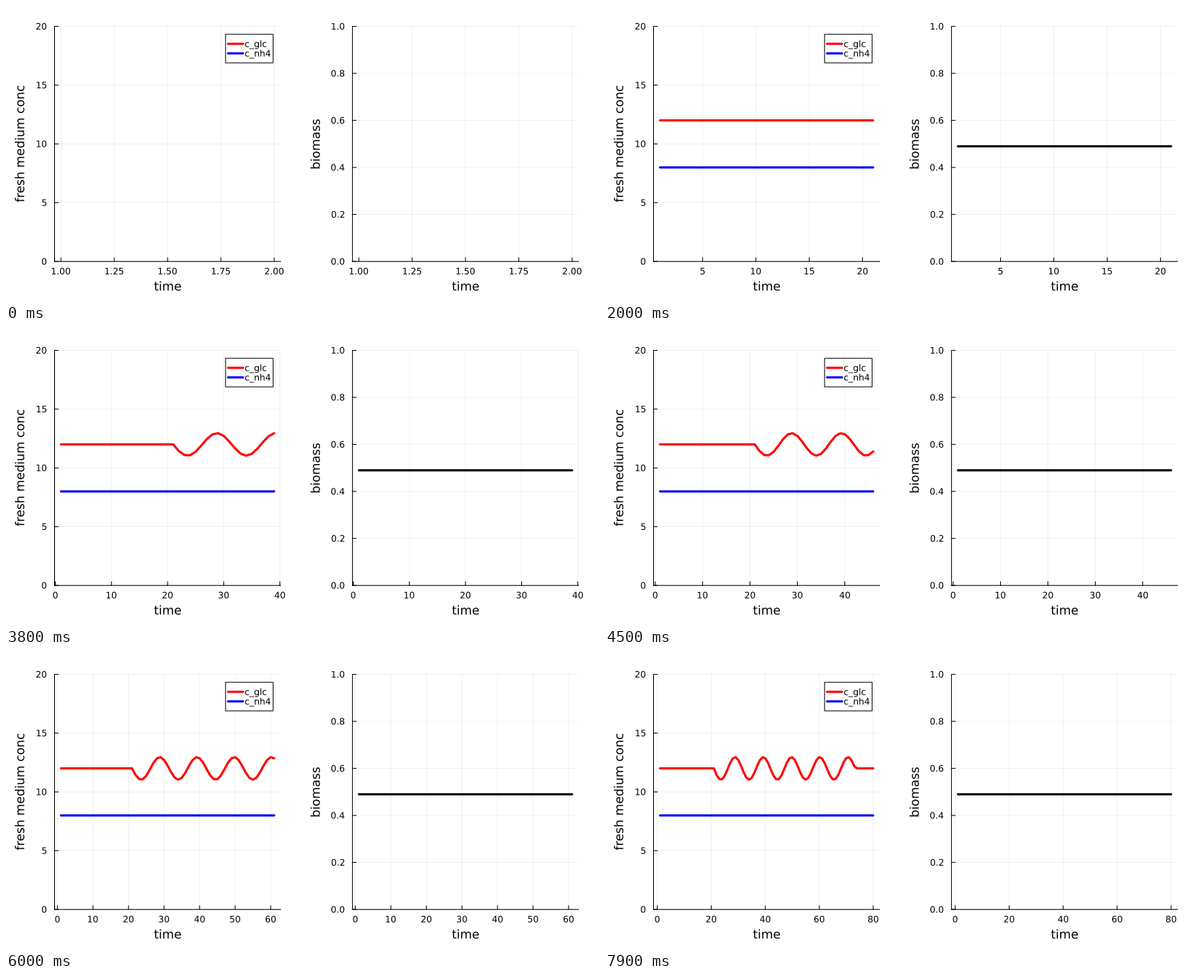
These frames come from a looping animation (800 px wide and 400 px high, 8 s). A matplotlib script:

```python
import numpy as np
import matplotlib.pyplot as plt
from matplotlib.animation import FuncAnimation
from matplotlib.patches import PathPatch, Rectangle
from matplotlib.textpath import TextPath
from matplotlib.transforms import Affine2D

plt.rcParams["font.family"] = "DejaVu Sans"

FRAMES, INTERVAL = 80, 100
DPI = 100
PX = 72 / DPI                     # one pixel in points
TOP, BOTTOM = 27.5, 345.2
WIDTH = 305.0
LEFTS = (65.5, 467.4)
SMALL, LARGE = 12, 16.5

fig = plt.figure(figsize=(8, 4), dpi=DPI, facecolor="white")
ax = fig.add_axes([0, 0, 1, 1])
ax.set_xlim(0, 800)
ax.set_ylim(400, 0)
ax.axis("off")


def line(xs, ys, color="black", width=1.0, **kw):
    return ax.plot(xs, ys, color=color, lw=width * PX, snap=False, **kw)[0]


def curve(color, z=4):
    return line([], [], color, 3, zorder=z,
                solid_capstyle="round", solid_joinstyle="round")


def grid(xs, ys):
    return line(xs, ys, width=0.55, alpha=0.1, zorder=1)


def text(x, y, s, size=SMALL, align=0.5, angle=0):
    """Outline text; y is the baseline, align 0 / 0.5 / 1 = left / centre / right."""
    path = TextPath((0, 0), s, size=size)
    box = path.get_extents()
    place = (Affine2D().translate(-box.x0 - align * box.width, 0)
             .scale(1, -1).rotate_deg(angle).translate(x, y))
    return ax.add_patch(PathPatch(place.transform_path(path), fc="black",
                                  lw=0, snap=False, zorder=6))


def static_axes(left, y_max, labels, name, name_x):
    right = left + WIDTH
    line([left, left], [TOP, BOTTOM], zorder=3)
    line([left, right], [BOTTOM, BOTTOM], zorder=3)
    for i, s in enumerate(labels):
        y = BOTTOM + (TOP - BOTTOM) * i / (len(labels) - 1)
        grid([left, right], [y, y])
        line([left, left + 5], [y, y], zorder=3)
        text(left - 11, y + 4.3, s, align=1)
    text(left + WIDTH / 2, 384.5, "time", LARGE)
    text(name_x, (TOP + BOTTOM) / 2, name, LARGE, angle=-90)


def legend():
    ax.add_patch(Rectangle((296.2, 38.2), 64.1, 38.7, fc="white", ec="black",
                           lw=PX, snap=False, zorder=5))
    for y, color, s in ((51.1, "red", "c_glc"), (64.0, "blue", "c_nh4")):
        curve(color, 6).set_data([299.5, 319.8], [y, y])
        text(322.6, y + 4.3, s, align=0)


def choose_ticks(lo, hi):
    """Tick step with the best mix of count, coverage and roundness."""
    best = (-1, None, None)
    for scale in (0.1, 1, 10):
        for q, nice in ((1, 1), (5, 0.9), (2.5, 0.5), (2, 0.7), (3, 0.2)):
            step = q * scale
            first, last = int(np.ceil(lo / step)), int(np.floor(hi / step))
            ticks = np.arange(first, last + 1) * step
            count = len(ticks)
            if not 4 <= count <= 8:
                continue
            cover = 1.5 * (hi - lo) / (ticks[-1] - ticks[0])
            score = (1 - abs(count - 5) / 5) / 4 + cover / 3 + nice / 4
            if score > best[0] + 1e-9:
                best = (score, ticks, step)
    return best[1:]


def tick_format(step):
    digits = next(d for d in range(3) if abs(step - round(step, d)) < 1e-9)
    return f"{{:.{digits}f}}"


def glucose(t):
    return np.where((t > 21) & (t < 74), 12 - 0.96 * np.sin(0.6 * t), 12.0)


def to_y(v, v_max):
    return BOTTOM + (TOP - BOTTOM) * v / v_max


static_axes(LEFTS[0], 20, ["0", "5", "10", "15", "20"], "fresh medium conc", 24.5)
static_axes(LEFTS[1], 1, [f"{i / 5:.1f}" for i in range(6)], "biomass", 423.3)
legend()
glc, nh4, biomass = curve("red"), curve("blue"), curve("black")
moving = []


def update(frame):
    while moving:
        moving.pop().remove()
    n = frame + 1
    last = max(n, 2)
    pad = 0.03 * (last - 1)
    lo, hi = 1 - pad, last + pad
    ticks, step = choose_ticks(lo, hi)
    fmt = tick_format(step)

    def to_x(v, left):
        return left + WIDTH * (v - lo) / (hi - lo)

    for left in LEFTS:
        for v in ticks:
            x = to_x(v, left)
            moving.append(grid([x, x], [TOP, BOTTOM]))
            moving.append(line([x, x], [BOTTOM - 5, BOTTOM], zorder=3))
            moving.append(text(x, 362.6, fmt.format(v)))

    t = np.arange(1, n + 1) if n > 1 else np.array([])
    flat = np.ones(len(t))
    glc.set_data(to_x(t, LEFTS[0]), to_y(glucose(t), 20))
    nh4.set_data(to_x(t, LEFTS[0]), to_y(8 * flat, 20))
    biomass.set_data(to_x(t, LEFTS[1]), to_y(0.4897 * flat, 1))
    return [glc, nh4, biomass, *moving]


anim = FuncAnimation(fig, update, frames=FRAMES, interval=INTERVAL,
                     init_func=lambda: update(0), repeat=True, repeat_delay=0,
                     blit=False)
plt.show()
```
